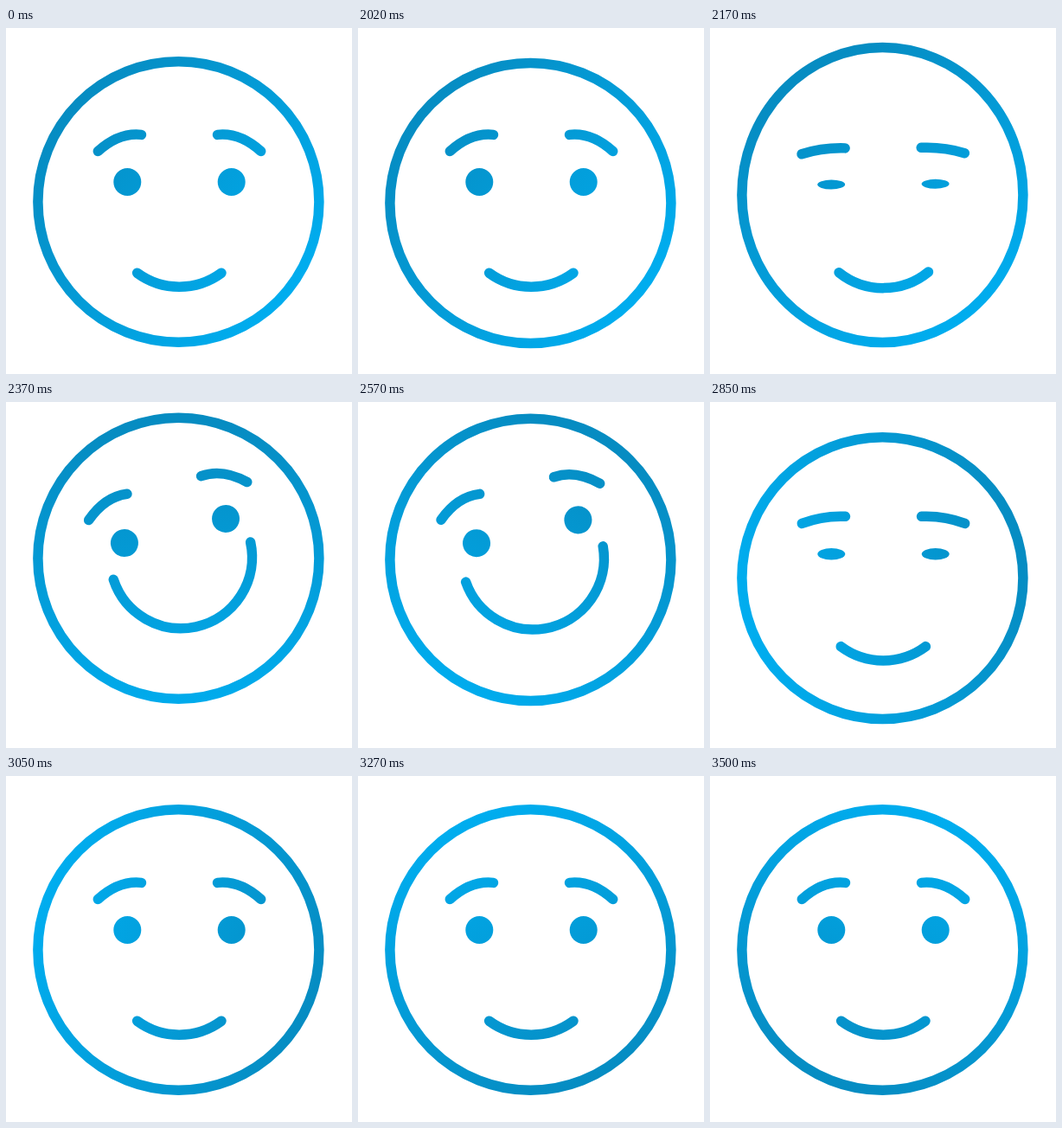
Recreate the animation shown at these times as an HTML page with a canvas. Size 400x400 px, loop 3520 ms.

```html
<!DOCTYPE html>
<html lang="en">
<head>
<meta charset="utf-8">
<title>Smiling face</title>
<style>
html, body { margin: 0; width: 100%; height: 100%; overflow: hidden; background: #fff; }
canvas { display: block; width: 400px; height: 400px; }
</style>
</head>
<body>
<canvas id="stage"></canvas>
<script>
const LOOP = 3520, REST = 2020, STROKE = 11.5, RAD = Math.PI / 180, TURN = 2 * Math.PI;
const canvas = document.getElementById('stage');
const ctx = canvas.getContext('2d');
const dpr = window.devicePixelRatio || 1;
canvas.width = canvas.height = 400 * dpr;

// Cosine ease from 0 to 1 between two times.
function ease(t, start, end) {
  const p = Math.min(1, Math.max(0, (t - start) / (end - start)));
  return (1 - Math.cos(Math.PI * p)) / 2;
}

// Eases in, holds at 1, then eases out.
const hold = (t, start, full, leave, end) => ease(t, start, full) - ease(t, leave, end);

// Eases up to a peak and straight back.
const bump = (t, start, peak, end) => hold(t, start, peak, peak, end);

function setGradient(t) {
  const progress = Math.max(0, t - REST) / (LOOP - REST);
  const angle = (140 - 255 * progress ** 1.2) * RAD;
  const x = 168 * Math.cos(angle), y = -168 * Math.sin(angle);
  const paint = ctx.createLinearGradient(200 + x, 201 + y, 200 - x, 201 - y);
  paint.addColorStop(0, '#068cc2');
  paint.addColorStop(1, '#00adef');
  ctx.strokeStyle = ctx.fillStyle = paint;
}

// Builds a path in moved and turned coordinates; painting stays in stage space.
function placed(x, y, angle, build) {
  ctx.save();
  ctx.translate(x, y);
  ctx.rotate(angle);
  ctx.beginPath();
  build();
  ctx.restore();
}

// Crouch, jump and land: the two edges of the ring move at different times.
function drawRing(t) {
  const top = 33 + 11 * bump(t, 2000, 2080, 2200)
    - 20.5 * hold(t, 2080, 2200, 2530, 2840) + 2 * bump(t, 2530, 2840, 2960);
  const bottom = 369 + 9 * bump(t, 2000, 2090, 2310)
    - 20 * hold(t, 2090, 2310, 2530, 2750) + 8 * bump(t, 2530, 2750, 2930);
  ctx.beginPath();
  ctx.ellipse(199.4, (top + bottom) / 2, 162.5, (bottom - top - STROKE) / 2, 0, 0, TURN);
  ctx.stroke();
}

function drawFace(t) {
  const dip = 3.5 * bump(t, 2060, 2150, 2350);
  const lift = hold(t, 2150, 2350, 2530, 2920);
  const grin = hold(t, 2140, 2350, 2530, 2870);
  const tilt = hold(t, 2150, 2360, 2530, 2825);
  const open = 1 - 0.7 * (bump(t, 2020, 2200, 2350) + bump(t, 2570, 2810, 2960));

  const eyes = build => placed(200.5 - 5 * tilt, 178 + dip - 29 * lift, -13.5 * RAD * tilt, build);
  for (const side of [-1, 1]) {
    eyes(() => ctx.ellipse(60.2 * side, 0, 16, 16 * open, 0, 0, TURN));
    ctx.fill();
    eyes(() => {
      ctx.moveTo(94.2 * side, -35.4);
      ctx.quadraticCurveTo(70 * side, -35.4 - 22 * open, 44 * side, -35.4 - 19.2 * open);
    });
    ctx.stroke();
  }

  const smile = (36.3 + 50.7 * grin) * RAD;
  placed(200.3 + 2 * tilt, 217 + dip - 37.5 * grin, -15.3 * RAD * tilt,
    () => ctx.arc(0, 0, 82.2, TURN / 4 - smile, TURN / 4 + smile));
  ctx.stroke();
}

function frame() {
  const now = performance.now() % LOOP;
  const t = now < REST ? 0 : now;
  ctx.setTransform(dpr, 0, 0, dpr, 0, 0);
  ctx.clearRect(0, 0, 400, 400);
  ctx.lineWidth = STROKE;
  ctx.lineCap = 'round';
  setGradient(t);
  drawRing(t);
  drawFace(t);
  requestAnimationFrame(frame);
}
frame();
</script>
</body>
</html>
```
